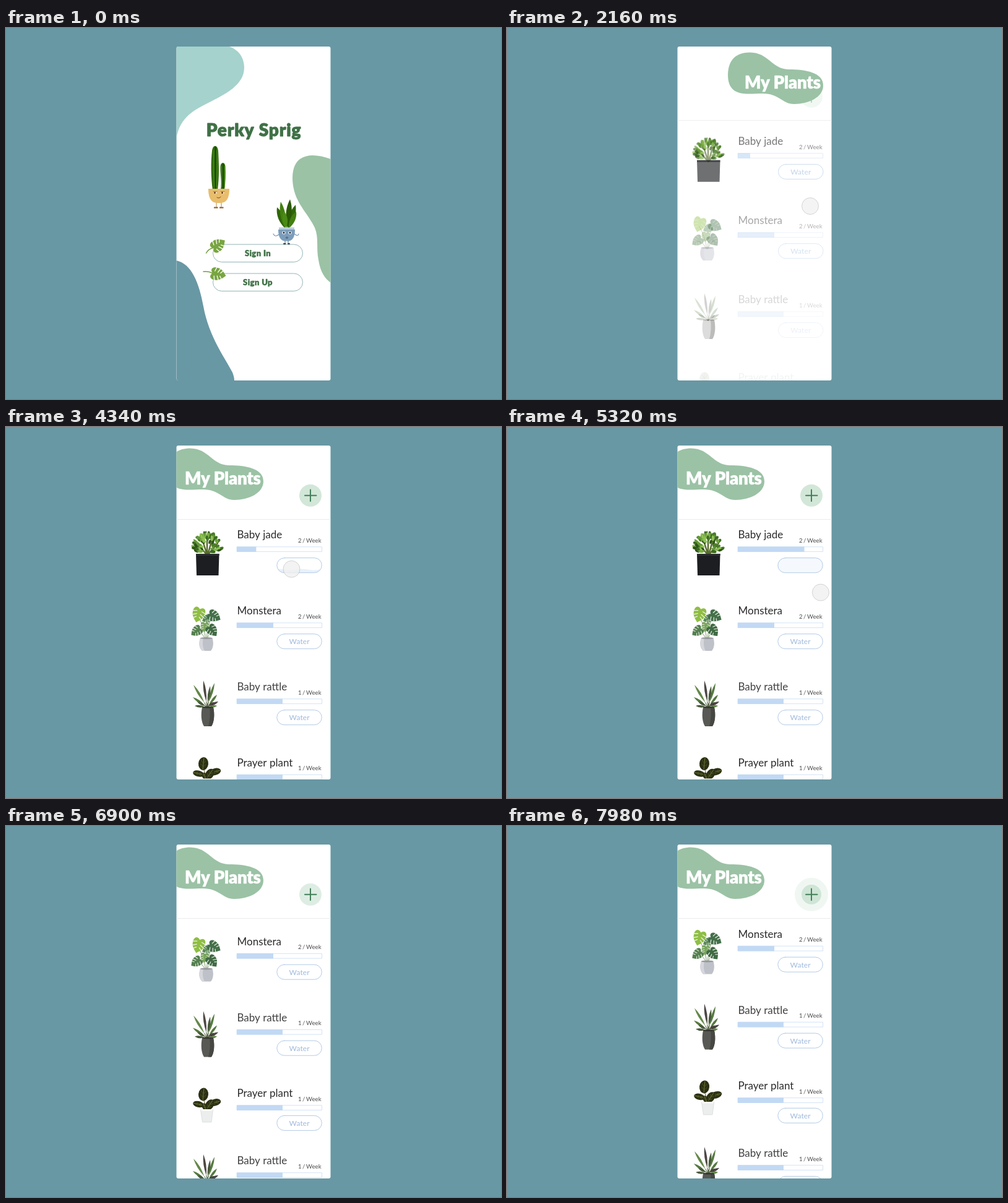
Recreate the animation shown at these times as an HTML page with a canvas. Size 800x600 px, loop 8 s.

```html
<!DOCTYPE html>
<html lang="en">
<head>
<meta charset="utf-8">
<title>Plant care app</title>
<style>
html, body { margin: 0; width: 100%; height: 100%; overflow: hidden; background: #6898a4; }
canvas { display: block; }
</style>
</head>
<body>
<canvas id="stage" width="800" height="600"></canvas>
<script>
const ctx = document.getElementById('stage').getContext('2d');
const LOOP = 8000;
const BG = '#6898a4', GREEN = '#9bc2a5', INK = '#3f7146';
const FONT = 'Lato, "Open Sans", sans-serif';

const clamp = v => Math.max(0, Math.min(1, v));
const span = (t, a, b) => clamp((t - a) / (b - a));
const smooth = p => p * p * (3 - 2 * p);
const mix = (a, b, p) => a + (b - a) * p;
const expoOut = p => p >= 1 ? 1 : 1 - Math.pow(2, -10 * p);

function rng(seed) {
  return () => (seed = (seed * 16807) % 2147483647) / 2147483647;
}
function fill(d, color) {
  ctx.fillStyle = color;
  ctx.fill(new Path2D(d));
}
function line(d, color, w = 1) {
  ctx.strokeStyle = color;
  ctx.lineWidth = w;
  ctx.lineCap = 'round';
  ctx.stroke(new Path2D(d));
}
function oval(x, y, rx, ry, color, rot = 0) {
  ctx.fillStyle = color;
  ctx.beginPath();
  ctx.ellipse(x, y, rx, ry, rot, 0, Math.PI * 2);
  ctx.fill();
}
function pill(x, y, w, h, r, stroke, back) {
  ctx.beginPath();
  ctx.roundRect(x, y, w, h, r);
  if (back) { ctx.fillStyle = back; ctx.fill(); }
  if (stroke) { ctx.strokeStyle = stroke; ctx.lineWidth = 1; ctx.stroke(); }
}
function text(s, x, y, size, color, weight = 400, align = 'left', gap = 0) {
  ctx.font = `${weight} ${size}px ${FONT}`;
  ctx.textAlign = align;
  ctx.letterSpacing = gap + 'px';
  ctx.fillStyle = color;
  ctx.fillText(s, x, y);
  ctx.letterSpacing = '0px';
}
function heavy(s, x, y, size, color, align, gap, extra) {
  text(s, x, y, size, color, 900, align, gap);
  ctx.letterSpacing = gap + 'px';
  ctx.strokeStyle = color;
  ctx.lineWidth = extra;
  ctx.lineJoin = 'round';
  ctx.strokeText(s, x, y);
  ctx.letterSpacing = '0px';
}
// Pointed leaf from base to tip, w is the bulge
function blade(x1, y1, x2, y2, w, color) {
  const mx = mix(x1, x2, .55), my = mix(y1, y2, .55);
  const len = Math.hypot(x2 - x1, y2 - y1);
  const nx = -(y2 - y1) / len * w, ny = (x2 - x1) / len * w;
  fill(`M${x1} ${y1}Q${mx + nx} ${my + ny} ${x2} ${y2}Q${mx - nx} ${my - ny} ${x1} ${y1}Z`, color);
}
function at(x, y, draw, rot = 0, scale = 1) {
  ctx.save();
  ctx.translate(x, y);
  ctx.rotate(rot);
  ctx.scale(scale, scale);
  draw();
  ctx.restore();
}

// Split leaf lying along +x, 24 long
function splitLeaf(color, cut) {
  fill('M2 0C-4 -5 0 -11 8 -10C16 -10 20 -4 24 0C19 5 15 10 8 10C0 11 -4 5 2 0Z', color);
  for (const s of [-1, 1]) {
    line(`M5 ${s * 4}L7 ${s * 11}M10 ${s * 3}L13.5 ${s * 10}M14.5 ${s * 2.5}L18 ${s * 7}`, cut, 1.3);
  }
}

function cactusPal() {
  line('M340 282V290M348 282V290', '#b98a4a', 1);
  fill('M336 289.5H342.5V291.5H336ZM345 289.5H351.5V291.5H345Z', '#8a5a22');
  fill('M334 262C331 240 331 215 333 199C334 188 342 188 343 199C344 220 345 240 342 262Z', '#2f6d0a');
  line('M336 198C335 220 335 240 337 260M341 198C342 220 341 240 340 260', '#4c8a18', 1.2);
  line('M338.5 193V260', '#16420a', 2);
  fill('M347 262C349 248 346 235 346.5 224C347 216 354 216 354.5 224C355 236 355 248 353 262Z', '#2f6d0a');
  line('M348.5 224V258M353 224V258', '#4c8a18', 1);
  line('M351 220V259', '#16420a', 1.7);
  fill('M327 260H361C361 274 357 283 346 283H342C331 283 327 274 327 260Z', '#e8bd6c');
  for (const x of [338, 350]) {
    oval(x, 266.5, 2.6, 2.1, '#fff2d4');
    oval(x - .5, 266.5, 1.5, 1.8, '#74451c');
    line(`M${x - 3} 264.5H${x + 3}`, '#b9843a', 1);
  }
  line('M341 274Q344 276.5 347 273', '#74451c', 1);
}
function potPal() {
  line('M451 343V348M456 343V348', '#4d6478', 1);
  line('M449 349H451.5M456 349H458', '#2b3c4c', 2);
  line('M441 334Q435 339 432 333M466 333Q472 338 473 333', '#7695b0', 1.2);
  blade(451, 324, 438, 290, 9, '#2f6606');
  blade(456, 324, 468, 286, 9, '#2f6606');
  blade(451, 324, 444, 281, 8, '#427f10');
  blade(455, 324, 459, 277, 9, '#2a5a06');
  blade(453, 324, 449, 296, 8, '#4b8a16');
  blade(457, 324, 469, 297, 8, '#427f10');
  fill('M440 326H467C467 338 463 344.5 456 344.5H451C444 344.5 440 338 440 326Z', '#7b9dbb');
  fill('M441 322.5H466V326H441Z', '#b9cddd');
  for (const x of [449, 459]) {
    oval(x, 331, 2.6, 2.6, '#fff');
    oval(x, 331, 1.5, 1.7, '#1d2a38');
  }
  oval(454, 339, 1.8, 1.6, '#30485e');
  oval(454, 339, .8, .7, '#9ab4ca');
}

function signButton(label, y) {
  pill(334.5, y, 145, 28.5, 14.2, '#93b4b5', '#fff');
  heavy(label, 407, y + 19, 13, INK, 'center', .4, .4);
}

function home() {
  fill('M275 30H361C378 36 385 50 385 64C385 92 355 107 325 122C299 135 279 148 275 182Z', '#a5d2cd');
  fill('M525 212C505 205 488 203 475 212C463 221 461 240 465 260C470 285 490 303 499 323C506 340 501 355 505 375C508 395 516 406 525 412Z', GREEN);
  fill('M275 376C300 381 312 412 319 450C328 500 355 535 366 557Q369 565 369 570H275Z', BG);
  line('M275.5 380V570', 'rgba(255,255,255,.3)', 1);
  heavy('Perky Sprig', 400.5, 175, 28, INK, 'center', .8, .9);
  cactusPal();
  signButton('Sign In', 350);
  signButton('Sign Up', 397);
  potPal();
  line('M337 355Q327 357 323.5 364', '#6f9d3c', 1.5);
  at(334, 357, () => splitLeaf('#78a541', '#fff'), -.6);
  line('M335 397Q327 393 319 394', '#6f9d3c', 1.5);
  at(332, 396, () => splitLeaf('#78a541', '#fff'), .2);
}

// Plant pictures, y measured from the row title
function jade() {
  const r = rng(41);
  const greens = ['#2f5419', '#4b7d2a', '#79ad41', '#3c6a22', '#8fc254', '#64983a'];
  line('M325 33L308 14M326 33L342 14M325 33V6M325 33L316 4M326 33L334 4', '#566b2b', 2.5);
  for (let i = 0; i < 84; i++) {
    const a = mix(-2.95, -.2, r()), d = mix(.3, 1, Math.sqrt(r()));
    const x = 325 + Math.cos(a) * d * 24, y = 31 + Math.sin(a) * d * 34;
    oval(x, y, 1.7 + r() * .7, 3.2 + r() * 1.3, greens[i % 6], a + Math.PI / 2 + r() - .5);
  }
  fill('M307 31H344.5L343.5 66H308Z', '#1d1e21');
  fill('M307 31H344.5V34H307Z', '#2c2d31');
}
function monstera() {
  line('M323 46Q320 26 311 10M324 46Q326 26 331 12M322 46Q317 34 308 34M325 46Q328 34 335 33', '#7d9a6a', 1);
  const leaf = (x, y, rot, k, c) =>
    at(x, y, () => { ctx.translate(-10.5, 0); splitLeaf(c, '#eef3ea'); }, rot, k);
  leaf(311, 6, 1.85, 1, '#8fbe44');
  leaf(325, 13, 2.7, .65, '#5c8a5a');
  leaf(336, 9, .5, .9, '#44704a');
  leaf(308, 33, 2.5, .8, '#55804f');
  leaf(321, 26, 1.7, .65, '#78a45c');
  leaf(333, 32, .9, .85, '#406a44');
  fill('M314 44H333.5C336 53 335 60 331 65H317C312 60 311 53 314 44Z', '#bfc1c9');
  fill('M314 44H319C317 52 318 60 321 65H317C312 60 311 53 314 44Z', '#d6d7dd');
  oval(323.7, 44.5, 9.8, 1.5, '#96989e');
}
function rattle() {
  const tips = [302, 17, 305, 31, 343, 24, 341, 31, 341, 13, 309, 24, 336, 25, 303, -3, 337, -6, 330, -1, 319, -10];
  const tones = ['#4a6f35', '#3a4a30', '#3c3336', '#5a8040'];
  for (let i = 0; i < tips.length; i += 2) {
    const x = tips[i], y = tips[i + 1];
    const sx = mix(325, x, .2), sy = mix(33, y, .2);
    line(`M325 34L${sx} ${sy}`, '#4a5a38', 1);
    blade(sx, sy, x, y, 3.8, tones[(i / 2) % 4]);
    line(`M${sx} ${sy}L${mix(sx, x, .85)} ${mix(sy, y, .85)}`, 'rgba(165,190,125,.55)', .6);
  }
  fill('M317 33H335C337.5 45 336.5 57 332 64H320C315.5 57 314.5 45 317 33Z', '#585954');
  fill('M329 33H335C337.5 45 336.5 57 332 64H327Q331 50 329 33Z', '#464742');
  oval(326, 33.3, 9.2, 1.4, '#343530');
}
function prayer() {
  line('M324 28L319 8M325 28L338 15M324 28L311 18M325 28L329 14', '#6a5a30', 1);
  const leaf = (x, y, rx, ry, rot) => {
    oval(x, y, rx, ry, '#2b3013', rot);
    at(x, y, () => {
      line(`M0 ${-ry * .85}V${ry * .85}`, '#7d8a45', .8);
      line(`M${-rx * .5} ${-ry * .5}L0 0L${rx * .5} ${-ry * .5}M${-rx * .5} 1L0 ${ry * .5}L${rx * .5} 1`, '#4b5423', .9);
    }, rot);
  };
  leaf(319, 2, 8, 10.5, .1);
  leaf(338, 15, 5.5, 9.5, 1.3);
  leaf(311, 18, 5, 9, 1.8);
  leaf(329, 19, 6.5, 9.5, .6);
  leaf(321, 22, 4, 6, -.4);
  fill('M314.5 27H334.5L332 47H317.5Z', '#eceded');
  fill('M314 26H335V29H314Z', '#f7f7f7');
  line('M334.5 27L332 47H317.5L314.5 27', '#d4d6d6', .7);
}

const ROWS = [
  { name: 'Baby jade', rate: 2, y: 174, level: 20, art: jade },
  { name: 'Monstera', rate: 2, y: 297, level: 59, art: monstera },
  { name: 'Baby rattle', rate: 1, y: 420, level: 74, art: rattle },
  { name: 'Prayer plant', rate: 1, y: 542.5, level: 74, art: prayer, lift: 1.3 },
  { name: 'Baby rattle', rate: 1, y: 651.5, level: 74, art: rattle }
];

function waterButton(t, x, y, watered) {
  ctx.save();
  pill(x, y, 72.5, 24, 12, null, '#fff');
  ctx.clip();
  if (watered) {
    const rise = span(t, 4200, 4860), gone = span(t, 5150, 5450);
    if (rise > 0 && gone < 1) {
      const top = y + 25 - rise * 29;
      let d = `M${x} ${y + 26}`;
      for (let i = 0; i <= 74; i += 2) d += `L${x + i} ${top + Math.sin(i / 6 + t / 90) * .9}`;
      ctx.globalAlpha *= 1 - gone;
      fill(d + `V${y + 26}Z`, '#e8f1fb');
    }
  }
  ctx.restore();
  pill(x, y, 72.5, 24, 12, '#b3cae6');
  const base = ctx.globalAlpha;
  if (watered) ctx.globalAlpha = base * (1 - span(t, 4160, 4300));
  text('Water', x + 36.3, y + 16.5, 12, '#9fb9dc', 400, 'center', .1);
  ctx.globalAlpha = base;
  if (!watered) return;
  const pop = smooth(span(t, 5400, 5700));
  if (pop > 0) at(x + 18.5, y + 12, () => {
    ctx.beginPath();
    ctx.arc(0, 0, 7, 0, Math.PI * 2);
    ctx.strokeStyle = '#9fb9dc';
    ctx.lineWidth = 1;
    ctx.stroke();
    line('M-3 0L-1 2.5L3.5 -2.5', '#86a5d2', 1.3);
    line('M-11 -6L-9 -4.5M-14 1L-11 0M9 -7L10 -8.5', '#86c4ea', 1.3);
    line('M11 -1L13 -2M-8 -9L-7 -7.5', '#b9dcf3', 1.2);
  }, 0, pop);
  ctx.globalAlpha = base * span(t, 5800, 6200);
  text('Burp', x + 36.2, y + 16.5, 12, '#9fb9dc');
  ctx.globalAlpha = base;
}

function row(t, r, i, scroll) {
  const enter = smooth(span(t, 1960 + i * 50, 2300 + i * 50));
  const leave = i ? 0 : span(t, 6380, 6740);
  if (!enter || leave >= 1) return;
  ctx.save();
  ctx.globalAlpha = enter * (1 - leave * .33);
  ctx.translate(leave * leave * 250, r.y - scroll + (1 - enter) * 24);
  r.art();
  text(r.name, 373.5, 6.3, 17, r.art === rattle ? '#414141' : '#2b2b2b');
  ctx.wordSpacing = '-.8px';
  text(r.rate + ' / Week', 509.5, 12.8, 9.6, '#4c4c4c', 400, 'right');
  ctx.wordSpacing = '0px';
  const level = i ? r.level : mix(20, 137, span(t, 4195, 5700));
  pill(373.5, 19.8, 137, 7.8, 0, '#d3e3f6', '#fff');
  ctx.fillStyle = '#c2d9f4';
  ctx.fillRect(373, 19.5, level, 8.5);
  waterButton(t, t < 4160 ? 438.5 : 437.8, 37.7 - (r.lift || 0), !i);
  ctx.restore();
}

function disc(r, color, alpha = 1) {
  ctx.save();
  ctx.globalAlpha *= alpha;
  oval(492, 110.8, r, r, color);
  ctx.restore();
}
function addButton(t) {
  const show = smooth(span(t, 2050, 2350));
  if (!show) return;
  ctx.save();
  ctx.globalAlpha = show;
  const fade = span(t, 6560, 6900), grow = span(t, 7000, 7980);
  disc(mix(18, 27, grow), '#d2e7d8', mix(mix(1, .72, fade), .34, grow));
  if (grow > 0) disc(mix(8, 16, grow), '#cfe5d6', grow);
  line('M483 110.7H501.5M492 101.5V120', '#43805a', 2);
  ctx.restore();
}

function list(t) {
  const scroll = expoOut(span(t, 6560, 7580)) * 122.6;
  ROWS.forEach((r, i) => row(t, r, i, scroll));
  ctx.globalAlpha = span(t, 1900, 2200);
  ctx.fillStyle = '#ececec';
  ctx.fillRect(275, 149, 250, 1);
  ctx.globalAlpha = 1;
  addButton(t);
  const away = 1 - smooth(span(t, 1780, 2420));
  at(265 * away, 14 * away, () => {
    fill('M262 72C262 52 270 34.5 298 34.5C328 35 332 61 360 62C388 62 416 67 416 88C416 107 392 118 369 118C349 118 346 101 318 101C300 101 284 104 272 96C264 90 262 80 262 72Z', GREEN);
    heavy('My Plants', 289, 92.5, 27.5, '#fff', 'left', -.2, .6);
  });
}

const PATH = [
  [240, 480, 14], [680, 502, 279], [980, 502, 280], [1580, 491, 291], [1720, 491, 291],
  [1820, 490, 288], [2300, 490, 288], [2500, 493, 288], [2800, 504, 281], [2980, 504, 281],
  [3780, 461.5, 230], [4980, 461.5, 229.5], [5640, 548, 302]
];
function pointer(t) {
  const i = PATH.findIndex(k => k[0] > t);
  if (i < 1) return;
  const a = PATH[i - 1], b = PATH[i];
  const p = smooth(span(t, a[0], b[0]));
  const press = span(t, 3820, 3920);
  ctx.beginPath();
  ctx.arc(mix(a[1], b[1], p), mix(a[2], b[2], p), 13.5, 0, Math.PI * 2);
  ctx.fillStyle = `rgba(240,240,240,${mix(.72, .8, press)})`;
  ctx.fill();
  ctx.strokeStyle = 'rgba(120,120,120,.28)';
  ctx.lineWidth = 1;
  ctx.stroke();
}

function draw(t) {
  ctx.globalAlpha = 1;
  ctx.fillStyle = BG;
  ctx.fillRect(0, 0, 800, 600);
  ctx.save();
  pill(275.5, 30, 249, 540, 3, null, '#fff');
  ctx.clip();
  if (t < 1800) {
    home();
    ctx.globalAlpha = span(t, 1720, 1800);
    ctx.fillStyle = '#fff';
    ctx.fillRect(275, 30, 250, 540);
    ctx.globalAlpha = 1;
  }
  if (t >= 1780) list(t);
  pointer(t);
  ctx.restore();
}

const start = performance.now();
function tick() {
  draw((performance.now() - start) % LOOP);
  requestAnimationFrame(tick);
}
tick();
</script>
</body>
</html>
```
